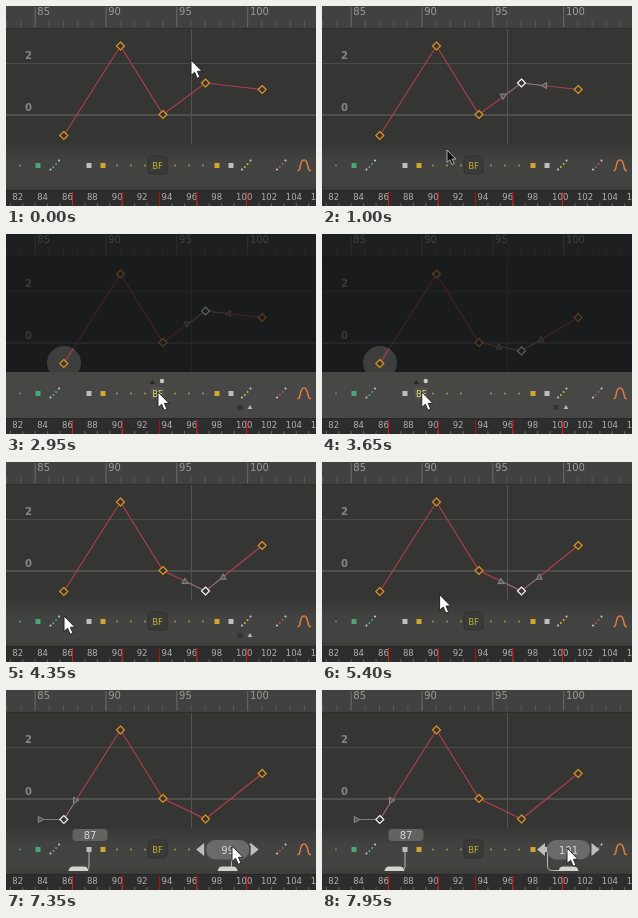
Write an HTML page that moves like this. It is 310 px wide and 200 px high and loops after 8000 ms.

```html
<!DOCTYPE html>
<html lang="en">
<head>
<meta charset="utf-8">
<title>Blend to frame</title>
<style>
html, body { margin: 0; width: 100%; height: 100%; overflow: hidden; background: #353533; }
svg { display: block; width: 100vw; height: 100vh; }
text { font-family: "DejaVu Sans", sans-serif; font-size: 10px; fill: #9a9a98; }
.time text { font-size: 8.5px; fill: #b0b0b0; }
.mid { text-anchor: middle; }
</style>
</head>
<body>
<svg viewBox="0 0 310 200" preserveAspectRatio="none">
  <defs>
    <linearGradient id="bar" x1="0" y1="0" x2="0" y2="1">
      <stop offset="0" stop-color="#373735"/><stop offset=".35" stop-color="#424240"/>
      <stop offset=".8" stop-color="#434341"/><stop offset="1" stop-color="#3b3b39"/>
    </linearGradient>
    <clipPath id="spot"><circle cx="58" cy="129" r="17"/></clipPath>
    <clipPath id="view"><rect width="310" height="138"/></clipPath>
  </defs>
  <g clip-path="url(#view)">
    <g id="grid"></g>
    <g id="curve"></g>
    <g id="dim">
      <rect width="310" height="138" fill="#0c0d11" opacity=".64"/>
      <circle cx="58" cy="129" r="17" fill="#3e3e3e"/>
      <g id="lit" clip-path="url(#spot)"></g>
    </g>
  </g>
  <rect y="138" width="310" height="47" fill="#474745"/>
  <rect id="shade" y="138" width="310" height="47" fill="url(#bar)"/>
  <g id="tools"></g>
  <g id="pins">
    <rect x="231.500" y="171" width="5" height="5" fill="#333332"/>
    <path d="M241.500 175L244 171L246.500 175Z" fill="#b5b5b5"/>
  </g>
  <g id="links"></g>
  <g id="button"></g>
  <g id="widget"></g>
  <g id="time" class="time"></g>
  <g id="cursor">
    <path d="M0 0V15.500L3.600 12.300L6.200 18.300L9 17.100L6.400 11.300H11Z" stroke-linejoin="round"/>
  </g>
</svg>
<script>
const LOOP = 8000, STEP = 50;
const $ = id => document.getElementById(id);
const rect = (x, y, w, h, fill, r = 0) =>
  `<rect x="${x}" y="${y}" width="${w}" height="${h}" rx="${r}" fill="${fill}"/>`;
const line = (x1, y1, x2, y2, color, w = 1) =>
  `<path d="M${x1} ${y1}L${x2} ${y2}" stroke="${color}" stroke-width="${w}" fill="none"/>`;
const text = (x, y, s, attr = '') => `<text x="${x}" y="${y}" ${attr}>${s}</text>`;
const dot = (x, y, r, fill) => `<circle cx="${x}" cy="${y}" r="${r}" fill="${fill}"/>`;

const graphX = f => 100.3 + 14.17 * (f - 90);
const timeX = f => 66.5 + 12.43 * (f - 87);
const cellX = f => timeX(f) + 6;

// Eased lookup in a table of [time, value, value, ...], held at both ends
function track(table, t) {
  let i = 0;
  while (i < table.length - 1 && table[i + 1][0] <= t) i++;
  const a = table[i], b = table[i + 1];
  if (!b || t <= a[0]) return a.slice(1);
  let k = (t - a[0]) / (b[0] - a[0]);
  k = k * k * (3 - 2 * k);
  return a.slice(1).map((v, j) => v + (b[j + 1] - v) * k);
}
const fade = (t, inAt, inEnd, outAt, outEnd) =>
  Math.max(0, Math.min(1, (t - inAt) / (inEnd - inAt), (outEnd - t) / (outEnd - outAt)));

const POINTER = [
  [0, 185, 54], [100, 185, 54], [400, 197, 76], [500, 198, 77], [700, 213, 121],
  [849, 213, 121], [850, 165, 140], [1000, 125, 144], [1200, 81, 155], [1400, 81, 155],
  [1650, 16, 154], [1900, 56, 153], [2100, 56, 153], [2200, 67, 154], [2400, 67, 154],
  [2900, 152, 158], [3100, 152, 158], [3900, 84, 158], [3950, 84, 158], [4350, 58, 154],
  [4450, 60, 154], [4750, 159, 181], [5199, 159, 181], [5200, 211, 140], [5550, 57, 128],
  [5650, 57, 128], [6000, 211, 139], [6649, 211, 139], [6650, 251, 136],
  [7200, 226, 156], [7450, 226, 156], [7700, 282, 158], [7950, 245, 158]
];
const LEFT = [[1400, 88], [1650, 82], [1900, 86], [2100, 86], [2200, 87]];
const RIGHT = [[7450, 99], [7700, 104], [7950, 101]];
const BLEND = [[3100, 0], [3900, 1]];

function drawGrid() {
  let s = rect(0, 0, 310, 138, '#353533') + rect(0, 0, 310, 22, '#414141');
  for (let f = 83; f < 105; f++) {
    const x = graphX(f) - .3;
    s += line(x, f % 5 ? 15 : 1, x, 21, f % 5 ? '#595959' : '#6c6c6c');
    if (f % 5 === 0) s += text(x + 2.2, 8.7, f);
  }
  s += line(0, 22.5, 310, 22.5, '#2f2f2e') + line(0, 57.5, 310, 57.5, '#4a4a48') +
    line(0, 109, 310, 109, '#6c6c6a', 1.2) + line(185.5, 23, 185.5, 138, '#525250');
  const bold = 'font-weight="bold" style="fill:#858583"';
  $('grid').innerHTML = s + text(19, 53, 2, bold) + text(19, 105, 0, bold);
}

function drawTools() {
  const sq = (x, c) => rect(x - 2.5, 157, 5, 5, c);
  const slash = (x, c) => dot(x - 4, 163.5, 1, '#d0d0d0') + dot(x + 4.5, 154.5, 1, '#d0d0d0') +
    dot(x - 1.2, 161, .9, c) + dot(x + 1.6, 158, .9, c);
  let s = dot(14, 159.5, .9, '#58a47e') + sq(32, '#49a878') + slash(48.5, '#52b08c') +
    sq(83, '#bdbdbd') + sq(97, '#cfa92c') + sq(211, '#cfa92c') + sq(225, '#bdbdbd') +
    slash(240, '#d0b83c') + slash(275, '#b45c4c');
  for (const x of [111, 125, 139, 169, 183, 197]) s += dot(x, 159.5, .9, '#aea058');
  s += `<path d="M291.500 164.500H292.500C295 164.500 293 154 298 154S301 164.500 304 164.500H305" fill="none" stroke="#dd7c42" stroke-width="1.500"/>`;
  $('tools').innerHTML = s;
}

function drawTime() {
  let s = rect(0, 185, 310, 15, '#2d2d2d') + line(0, 184.5, 310, 184.5, '#272727');
  for (let f = 82; f < 108; f++) {
    const x = timeX(f);
    s += line(x, 197, x, 200, '#757575', .8);
    if (f % 2 === 0) s += text(x + 2, 194, f);
  }
  for (const f of [87, 91, 94, 97, 101])
    s += line(timeX(f), 186, timeX(f), 200, f === 94 ? '#a81414' : '#e41616');
  $('time').innerHTML = s;
}

function handle(k, to, turn) {
  let dx = -23, dy = 0;
  if (to) {
    const d = 22.8 / Math.hypot(to[0] - k[0], to[1] - k[1]);
    dx = (to[0] - k[0]) * d;
    dy = (to[1] - k[1]) * d;
  }
  const x = k[0] + dx, y = k[1] + dy;
  return line(k[0], k[1], x, y, '#7c7c7a') +
    `<path transform="translate(${x} ${y}) rotate(${turn})" d="M0 -3L3 2.500H-3Z" fill="#555553" stroke="#8a8a88"/>`;
}

function curveSvg(t) {
  const y = 77 + 52 * track(BLEND, t)[0];
  const keys = [[87, 129.5], [91, 40], [94, 108.5], [97, y], [101, 83.5]]
    .map(([f, v]) => [graphX(f), v]);
  const sel = t < 450 ? -1 : t < 5600 ? 3 : 0;
  let s = `<polyline points="${keys.join(' ')}" fill="none" stroke="#b03f4f" stroke-width="1.100"/>`;
  if (sel >= 0) {
    const turns = sel === 0 ? [90, 90] : y < 105 ? [180, -90] : [0, 0];
    s += handle(keys[sel], keys[sel - 1], turns[0]) + handle(keys[sel], keys[sel + 1], turns[1]);
  }
  keys.forEach(([x, v], i) => {
    s += `<path d="M${x} ${v - 4}l4 4l-4 4l-4 -4Z" fill="#353533" stroke="${i === sel ? '#f2f2f2' : '#e0951f'}" stroke-width="1.200"/>`;
  });
  return s;
}

const marker = x => `<path d="M${x - 10} 181C${x - 9} 177 ${x - 7} 176.500 ${x - 5} 176.500H${x + 5}C${x + 7} 176.500 ${x + 9} 177 ${x + 10} 181Z" fill="#d2d2d0"/>`;

function link(x, f) {
  const to = cellX(f), d = to < x ? -1 : 1;
  return `<path d="M${x} 162V176Q${x} 180.500 ${x + 5 * d} 180.500H${to}" fill="none" stroke="#b8b8b6"/>` + marker(to);
}
const label = (x, s) => rect(x - 17.500, 139, 35, 12, '#626260', 4) +
  text(x, 148.5, s, 'class="mid" style="fill:#d6d6d4"');

function widgetSvg(f) {
  const x = cellX(f);
  const tri = (at, d) => `<path d="M${at} 153V166L${at + 8 * d} 159.500Z" fill="#bdbdbb"/>`;
  return tri(x - 23.5, -1) + tri(x + 23, 1) + rect(x - 21.500, 150, 43, 19.5, '#6a6a68', 9) +
    text(x, 163.5, f, 'class="mid" style="fill:#d6d6d4"');
}

function drawPair(t) {
  const first = fade(t, 1200, 1300, 2450, 2600), second = fade(t, 7200, 7350, 8000, 8100);
  const show = Math.max(first, second);
  $('links').style.opacity = $('widget').style.opacity = show;
  if (!show) return;
  const left = first > 0;
  const f = Math.round(track(left ? LEFT : RIGHT, t)[0]);
  $('links').innerHTML = left
    ? link(83, f) + link(225.5, 109) + label(226, 109)
    : link(83, 87) + link(225.5, f) + label(84, 87);
  $('widget').innerHTML = widgetSvg(f);
}

function drawButton(t) {
  const hot = t >= 2900 && t < 4000;
  const x = hot ? 151.5 - 68 * track(BLEND, t)[0] : 151.5;
  let s = hot ? '' :
    `<rect x="142" y="150" width="19" height="18" rx="3" fill="#3a3a38" stroke="#31312f"/>`;
  if (hot) s += rect(x - 7, 153, 14, 12, '#50504c', 3) +
    `<path d="M${x - 8} 150l3 -4l3 4Z" fill="#282828"/>` + dot(x + 4.5, 147, 2.2, '#c8c8c6');
  s += text(x, 162.5, 'BF', `class="mid" style="font-size:8.5px;fill:${hot ? '#e0d66c' : '#bfae3a'}"`);
  $('button').innerHTML = s;
}

function drawCursor(t) {
  const [x, y] = track(POINTER, t);
  const gone = t >= 700 && t < 850 || t >= 5050 && t < 5200;
  const dark = t >= 850 && t < 1150 || t >= 6650 && t < 6900;
  const c = $('cursor');
  c.style.opacity = gone ? 0 : 1;
  c.setAttribute('transform', `translate(${x} ${y}) scale(${dark ? .8 : 1})`);
  c.setAttribute('fill', dark ? '#111' : '#fff');
  c.setAttribute('stroke', dark ? '#ccc' : '#222');
}

function draw(t) {
  const dim = fade(t, 2700, 2950, 3950, 4200);
  $('curve').innerHTML = $('lit').innerHTML = curveSvg(t);
  $('dim').style.opacity = dim;
  $('shade').style.opacity = 1 - dim;
  $('pins').style.opacity = fade(t, 2500, 2600, 4950, 5050);
  drawPair(t);
  drawButton(t);
  drawCursor(t);
}

function tick() {
  draw(Math.floor(performance.now() % LOOP / STEP) * STEP);
  requestAnimationFrame(tick);
}
drawGrid();
drawTools();
drawTime();
tick();
</script>
</body>
</html>
```
